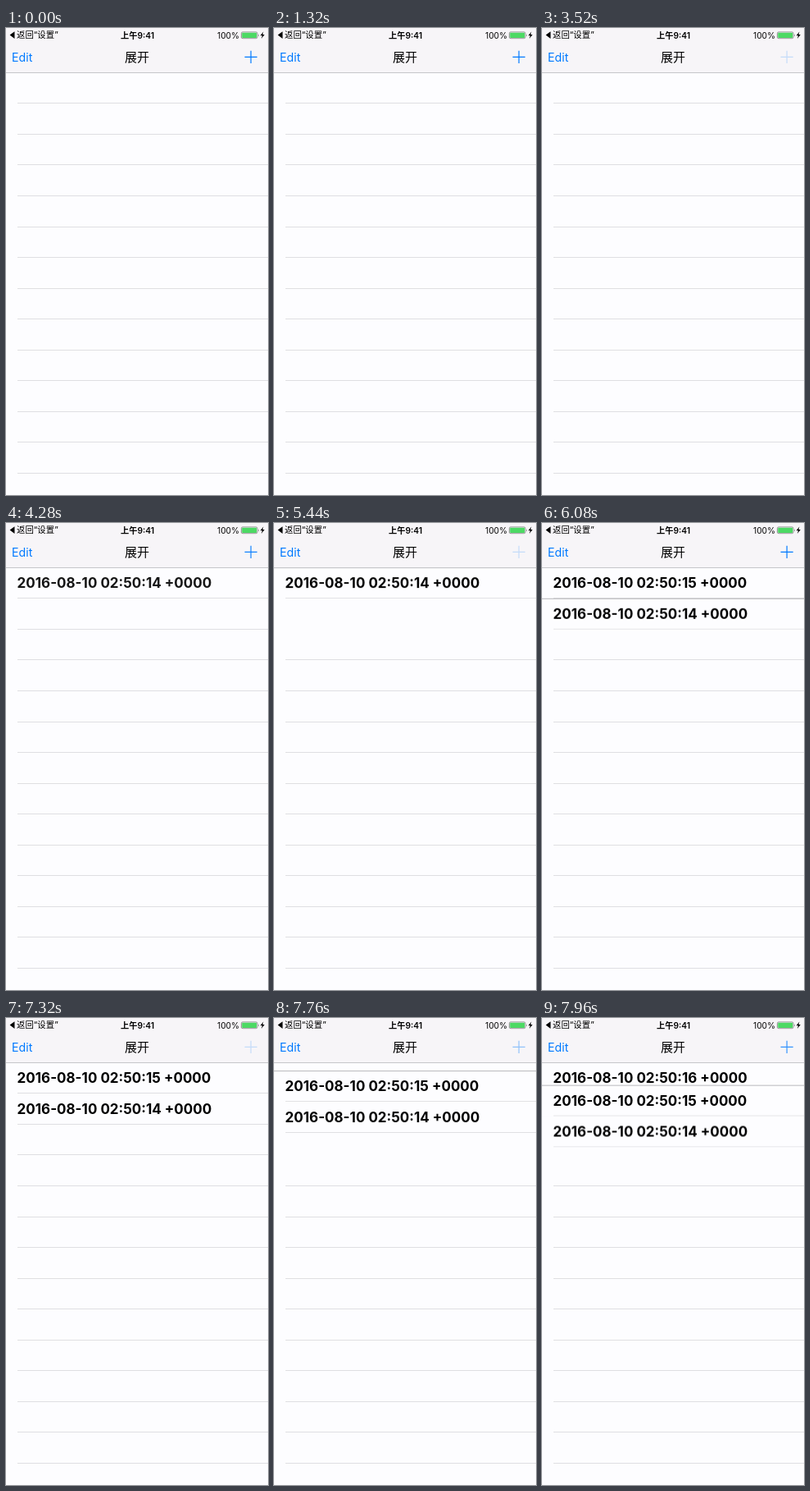
Recreate the animation shown at these times as an HTML page. Size 320x569 px, loop 8 s.

```html
<!DOCTYPE html>
<html lang="zh-CN">
<head>
<meta charset="utf-8">
<title>展开</title>
<style>
  :root {
    --paper: #fdfdff;
    --line: #dfdfe2;
    --tint: #007aff;
  }
  html, body {
    margin: 0;
    width: 100%;
    height: 100%;
    overflow: hidden;
    background: var(--paper);
    color: #000;
    font-family: Inter, "Noto Sans CJK SC", "Noto Sans CJK", sans-serif;
  }
  body { position: relative; }

  .bar {
    position: absolute;
    z-index: 5;
    inset: 0 0 auto;
    height: 54px;
    background: #f7f5f8;
    border-bottom: 1px solid #c6c6c9;
  }
  .bar span {
    position: absolute;
    white-space: nowrap;
    line-height: 18px;
  }
  .bar svg { position: absolute; left: 0; top: 0; }
  .small { top: 0; font-size: 10.2px; }
  .back { left: 13px; font-size: 10.4px; }
  .clock { left: 0; right: 0; text-align: center; font-weight: 600; padding-left: 1px; }
  .charge { right: 35px; }
  .edit { left: 7px; top: 27px; font-size: 14.2px; color: var(--tint); }
  .title { left: 0; right: 0; top: 27px; text-align: center; font-size: 15px; font-weight: 500; }

  .sep {
    position: absolute;
    left: 14px;
    right: 0;
    height: 1px;
    background: var(--line);
  }
  .row {
    position: absolute;
    left: 0;
    right: 0;
    top: 55px;
    height: 37px;
    padding-left: 13.6px;
    box-sizing: border-box;
    background: var(--paper);
    font-size: 17px;
    font-weight: 700;
    line-height: 37.5px;
    white-space: nowrap;
  }
  .row::after {
    content: "";
    position: absolute;
    left: 14px;
    right: 0;
    bottom: 0;
    height: 1px;
    background: var(--line);
  }
  .edge {
    position: absolute;
    inset: -1px 0 auto;
    height: 1px;
    background: #b9b9bc;
  }

  .plus { animation: press 8s infinite; }
  .third { animation: show-third 8s step-end infinite; }
  .second { animation: show-second 8s step-end infinite, slide-second 8s infinite; }
  .first { animation: fade-first 8s infinite, slide-first 8s infinite; }
  .first .edge { animation: move-two 8s step-end infinite; }
  .second .edge { animation: move-three 8s step-end infinite; }
  .gap2 { animation: hide-two 8s step-end infinite; }
  .gap3 { animation: hide-three 8s step-end infinite; }

  /* The custom curve is the part of ease-in-out that fits before the loop ends. */
  @keyframes press {
    0%, 43.99% { opacity: 1; animation-timing-function: step-end; }
    44% { opacity: .2; animation-timing-function: linear; }
    46.5% { opacity: .2; animation-timing-function: ease-in-out; }
    55.25% { opacity: 1; animation-timing-function: step-end; }
    67.75% { opacity: .2; animation-timing-function: ease-in-out; }
    76.5% { opacity: 1; animation-timing-function: step-end; }
    91.49% { opacity: .2; animation-timing-function: linear; }
    93.87% { opacity: .2; animation-timing-function: cubic-bezier(.434, 0, .673, .645); }
    100% { opacity: .851; }
  }
  @keyframes fade-first {
    0%, 46.5% { opacity: 0; animation-timing-function: ease-in-out; }
    55.25%, 100% { opacity: 1; }
  }
  @keyframes slide-first {
    0%, 67.75% { transform: translateY(0); animation-timing-function: ease-in-out; }
    76.5% { transform: translateY(38px); animation-timing-function: linear; }
    93.87% { transform: translateY(38px); animation-timing-function: cubic-bezier(.434, 0, .673, .645); }
    100% { transform: translateY(68.3px); }
  }
  @keyframes slide-second {
    0%, 93.87% { transform: translateY(0); animation-timing-function: cubic-bezier(.434, 0, .673, .645); }
    100% { transform: translateY(30.5px); }
  }
  @keyframes show-second {
    0% { visibility: hidden; }
    67.75%, 100% { visibility: visible; }
  }
  @keyframes show-third {
    0% { visibility: hidden; }
    93.87%, 100% { visibility: visible; }
  }
  @keyframes move-two {
    0%, 76.5%, 100% { opacity: 0; }
    67.75% { opacity: 1; }
  }
  @keyframes move-three {
    0% { opacity: 0; }
    93.87%, 100% { opacity: 1; }
  }
  @keyframes hide-two {
    0%, 76.5%, 100% { opacity: 1; }
    67.75% { opacity: 0; }
  }
  @keyframes hide-three {
    0% { opacity: 1; }
    93.87%, 100% { opacity: 0; }
  }
</style>
</head>
<body>
  <div class="bar">
    <span class="small back">返回“设置”</span>
    <span class="small clock">上午9:41</span>
    <span class="small charge">100%</span>
    <span class="edit">Edit</span>
    <span class="title">展开</span>
    <svg width="320" height="54">
      <path d="M10.5 4.2V13L4.6 8.6z"/>
      <rect x="287.4" y="4.9" width="19.6" height="7.8" rx="1.6" fill="none" stroke="#555" stroke-width=".6"/>
      <rect x="288.2" y="5.7" width="18" height="6.2" rx=".9" fill="#4cd964"/>
      <path d="M308 7.4q1.2 1.4 0 2.8z" fill="#333"/>
      <path d="M314.4 4.6L310.6 9.3H313L311.8 13L315.8 8H313.4z"/>
      <path class="plus" d="M291.5 35.3H306.7M299.1 27.7V42.9" stroke="#007aff" stroke-width="1.2"/>
    </svg>
  </div>

  <div id="seps"></div>
  <div class="row third">2016-08-10 02:50:16 +0000</div>
  <div class="row second"><i class="edge"></i>2016-08-10 02:50:15 +0000</div>
  <div class="row first"><i class="edge"></i>2016-08-10 02:50:14 +0000</div>

  <script>
    const seps = document.getElementById("seps");
    for (let k = 1; k <= 13; k++) {
      const sep = document.createElement("div");
      sep.className = "sep gap" + k;
      sep.style.top = Math.floor(54.3 + 37.547 * k) + "px";
      seps.append(sep);
    }
  </script>
</body>
</html>
```
